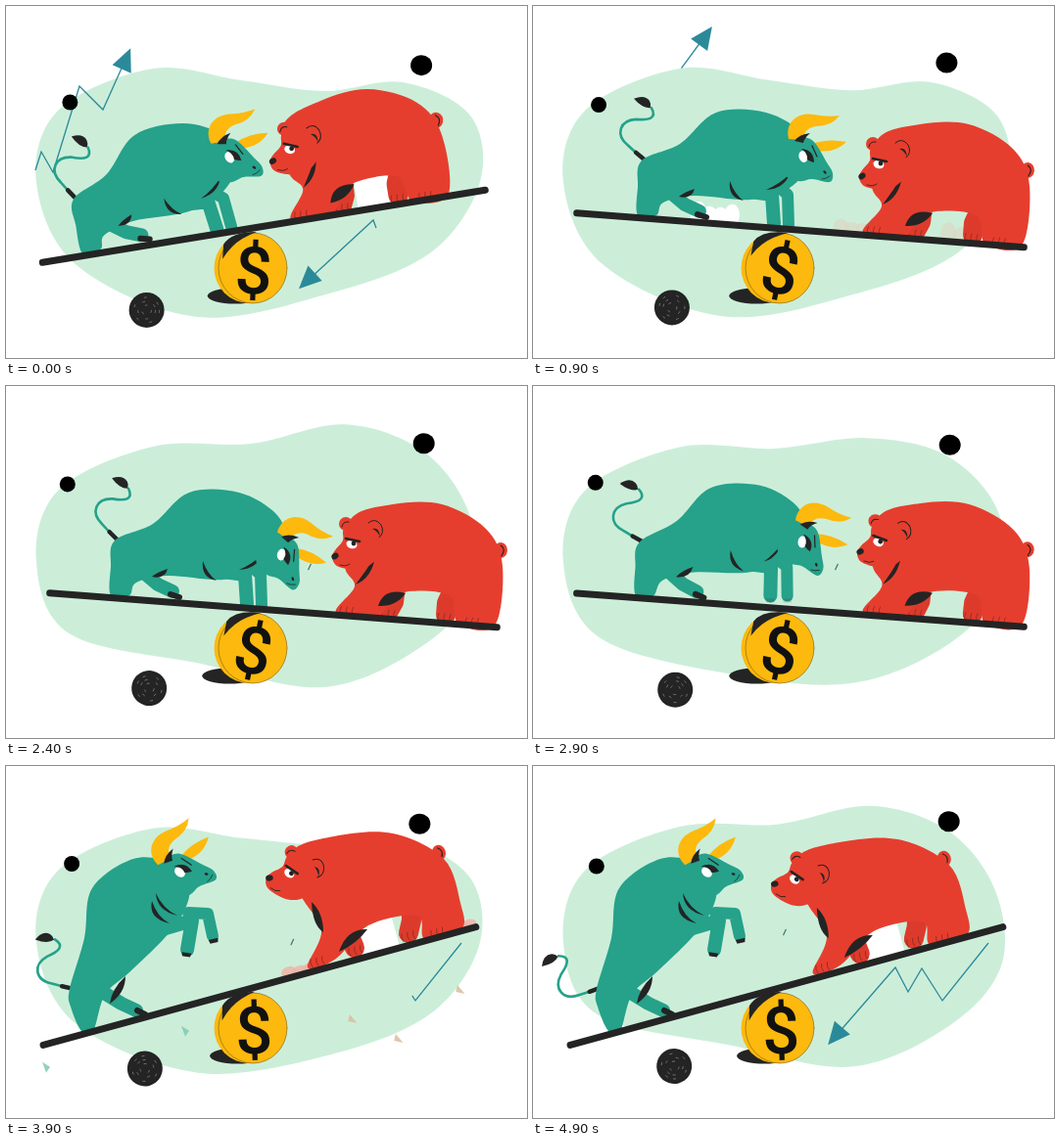
An HTML page with a canvas for the animation above (5000 ms loop, 532 by 360 pixels).

```html
<!DOCTYPE html>
<html lang="en">
<head>
<meta charset="utf-8">
<title>Bull and bear on a seesaw</title>
<style>
html, body { margin: 0; width: 100%; height: 100%; overflow: hidden; background: #fff; }
canvas { display: block; }
</style>
</head>
<body>
<canvas id="stage" width="532" height="360"></canvas>
<script>
const ctx = document.getElementById('stage').getContext('2d');
const LOOP = 5000, STEP = 100, RAD = Math.PI / 180;
const PIVOT = [250, 227.5], DOWN = 4.4, UP = -15.3;
const INK = '#242424', TEAL = '#26a18a', RED = '#e63e2e', DEEP_RED = '#dc3b2c';
const GOLD = '#fdb90d', MINT = '#cceed9', LINE = '#2b8a99';

// Timing: linear ramp, smooth ease, a soft on-off pulse, and a settling decay.
const ramp = (t, a, b) => Math.min(1, Math.max(0, (t - a) / (b - a)));
const ease = (t, a, b) => (1 - Math.cos(Math.PI * ramp(t, a, b))) / 2;
const pulse = (t, a, b) => Math.min(1, 2 * Math.sin(Math.PI * ramp(t, a, b)));
const bell = (t, mid, width) => Math.exp(-(((t - mid) / width) ** 2));
const settle = t => (1 - ramp(t, 0, 800)) ** 2;
const lerp = (a, b, f) => a + (b - a) * f;
const mix = (a, b, f) => a.map((v, i) => lerp(v, b[i], f));

// Stage coordinates to plank coordinates for a plank at the given tilt.
function onPlank(deg, pts) {
  const c = Math.cos(deg * RAD), s = Math.sin(deg * RAD), out = [];
  for (let i = 0; i < pts.length; i += 2) {
    const x = pts[i] - PIVOT[0], y = pts[i + 1] - PIVOT[1];
    out.push(x * c + y * s, y * c - x * s);
  }
  return out;
}

// A part as seen with the plank down and with the plank up.
function part(low, high) {
  const a = onPlank(DOWN, low), b = onPlank(UP, high);
  return f => mix(a, b, f);
}

const BLOB_A = [31,180, 54,106, 150,64, 240,76, 325,87, 405,78, 474,112, 484,180, 434,252, 330,294, 195,318, 72,265];
const BLOB_B = [31,180, 54,106, 150,62, 250,59, 345,39, 425,66, 472,128, 478,205, 425,266, 325,308, 200,284, 66,254];

const bull = {
  body: part(
    [111,158, 150,141, 187,109, 238,109, 276,131, 284,158, 262,186, 222,198, 165,194, 133,201, 126,214, 107,214, 107,185],
    [65,228, 80,176, 88,125, 130,95, 168,100, 187,126, 179,154, 160,178, 126,211, 101,234, 89,271, 77,271, 66,246]),
  near: part([215,189, 244,193, 246,223], [163,166, 190,158, 185,188]),
  far: part([250,184, 260,193, 261,224], [186,150, 206,151, 211,174]),
  hind: part([142,192, 155,203, 170,210], [100,232, 118,243, 133,250]),
  hoof: part([168,213, 177,216], [134,250, 142,254]),
  thigh: part([165,187, 162,198, 149,195, 155,190], [122,215, 122,232, 106,243, 108,228]),
  shoulder: part([201,179, 199,196, 215,199, 206,193], [149,138, 145,156, 167,161, 154,154]),
  neck: part([262,172, 256,187, 238,188, 252,182], [153,130, 154,148, 175,153, 160,146]),
  tail: part([113,156], [67,227]),
  eye: part([279,154], [180,107]),
  lowered: onPlank(DOWN, [284,174])
};

const bear = {
  body: part(
    [352,136, 395,121, 445,121, 490,146, 507,184, 499,245, 462,243, 452,214, 402,212, 378,237, 337,232, 356,205, 346,184],
    [292,88, 335,72, 395,69, 447,95, 464,140, 465,167, 428,177, 420,153, 370,163, 337,197, 308,206, 322,168, 300,130]),
  front: part([398,205, 396,221, 391,230], [343,160, 352,176, 356,186]),
  back: part([458,205, 450,222, 449,234], [414,142, 414,158, 411,171]),
  chest: part([377,174, 374,196, 357,203, 367,190], [312,139, 313,163, 324,170, 324,150]),
  pit: part([380,225, 386,206, 408,212, 398,226], [340,190, 348,166, 369,167, 358,182]),
  gap: part([406,240], [358,198]),
  tail: part([504,168], [441,89]),
  eye: part([353,160], [290,108])
};

function smooth(p) {
  const n = p.length / 2, at = i => [p[(i + n) % n * 2], p[(i + n) % n * 2 + 1]];
  ctx.beginPath();
  ctx.moveTo(p[0], p[1]);
  for (let i = 0; i < n; i++) {
    const [a, b, c, d] = [at(i - 1), at(i), at(i + 1), at(i + 2)];
    ctx.bezierCurveTo(b[0] + (c[0] - a[0]) / 6, b[1] + (c[1] - a[1]) / 6,
      c[0] - (d[0] - b[0]) / 6, c[1] - (d[1] - b[1]) / 6, c[0], c[1]);
  }
}

function fill(color) { ctx.fillStyle = color; ctx.fill(); }
function stroke(color, w) { ctx.strokeStyle = color; ctx.lineWidth = w; ctx.stroke(); }
function blobby(p, color) { smooth(p); fill(color); }
function path(d, color) { ctx.fillStyle = color; ctx.fill(new Path2D(d)); }
function curve(d, color, w) { ctx.strokeStyle = color; ctx.lineWidth = w; ctx.stroke(new Path2D(d)); }

function oval(x, y, rx, ry, color, turn = 0) {
  ctx.beginPath();
  ctx.ellipse(x, y, rx, ry, turn, 0, 7);
  fill(color);
}

function line(p, color, w) {
  ctx.beginPath();
  for (let i = 0; i < p.length; i += 2) ctx.lineTo(p[i], p[i + 1]);
  stroke(color, w);
}

// Ends at the first and third points, bulging towards the others.
function crescent(p) {
  ctx.beginPath();
  ctx.moveTo(p[0], p[1]);
  ctx.quadraticCurveTo(p[2], p[3], p[4], p[5]);
  ctx.quadraticCurveTo(p[6], p[7], p[0], p[1]);
  fill(INK);
}

function group(x, y, deg, draw) {
  ctx.save();
  ctx.translate(x, y);
  ctx.rotate(deg * RAD);
  draw();
  ctx.restore();
}

function faded(alpha, draw) {
  if (alpha <= 0) return;
  ctx.save();
  ctx.globalAlpha = alpha;
  draw();
  ctx.restore();
}

function arrow(p, from, to, size) {
  let len = 0;
  for (let i = 2; i < p.length; i += 2) len += Math.hypot(p[i] - p[i - 2], p[i + 1] - p[i - 1]);
  ctx.save();
  ctx.lineCap = 'butt';
  ctx.lineJoin = 'miter';
  ctx.setLineDash([Math.max(0, to - from) * len, len * 2]);
  ctx.lineDashOffset = -from * len;
  line(p, LINE, 1.3);
  ctx.restore();
  const [x0, y0, x, y] = p.slice(-4);
  group(x, y, Math.atan2(y - y0, x - x0) / RAD, () => {
    ctx.scale(size, size);
    path('M15 0L-8 -10L-8 11Z', LINE);
  });
}

function drawArrows(t) {
  const rise = ramp(t, 0, 900);
  if (t < 1300) {
    group(lerp(121, 174, rise), lerp(57, 33, rise), 12 * rise, () =>
      arrow([-91,111, -85,92, -73,113, -46,25, -22,49, 0,0],
        .83 * rise + .17 * ramp(t, 900, 1300), 1, 1 - ramp(t, 900, 1300)));
  }
  if (t < 400) arrow([378,227, 375,219, 310,279], t / 400, 1, 1 - t / 400);
  if (t > 3700) {
    const end = ramp(t, 3650, 4450);
    arrow([465,181, 418,240, 397,207, 383,231, 370,206, 311,274], 0, end, end < 1 ? 0 : 1);
  }
}

function drawBalls(t) {
  const a = (100 + t / 3300 * 360) * RAD, dx = 2.2 * Math.cos(a), dy = 2 * Math.sin(a);
  oval(424.5 + dx, 58.7 + dy, 11, 10.5, '#000');
  oval(65 - dx, 100.5 - dy, 8, 8, '#000');
  group(144 + dx, 309 + dy, Math.floor(t / 300) * 75, () => {
    oval(0, 0, 18, 18, INK);
    ctx.lineCap = 'butt';
    for (let r = 5; r < 17; r += 4) {
      ctx.setLineDash([3, 5 + r / 2]);
      ctx.beginPath();
      ctx.arc(0, 0, r, 0, 6.28);
      stroke('#8a8a8a', .7);
    }
  });
}

function drawCoin(tilt) {
  oval(230 - tilt * .4, 296.5, 28, 8, INK);
  oval(248.5, 268, 36, 36, GOLD);
  oval(252, 268, 35, 36, GOLD);
  stroke('#8f6b17', .7);
  group(250, 268, tilt * .5 + 5, () => path('M-28 -24Q-20 -37 6 -37Q-10 -31 -19 -22Q-25 -16 -29 -9Z', INK));
  group(253, 268, 9 + tilt * .7, () => {
    ctx.font = '500 67px Roboto, sans-serif';
    ctx.textAlign = 'center';
    ctx.fillStyle = '#111';
    ctx.fillText('$', 0, 26);
  });
}

function cloud(x0, x1, h, color, alpha) {
  const n = Math.round((x1 - x0) / 11);
  faded(alpha, () => {
    for (let i = 0; i <= n; i++) {
      const r = h * (.6 + .4 * Math.abs(Math.cos(i * 2.1)));
      oval(lerp(x0, x1, i / n), -r * .6 - 2, 8, r, color);
    }
  });
}

function drawDust(t) {
  const kick = pulse(t, 1200, 2100), brake = pulse(t, 600, 1200), stamp = pulse(t, 3500, 4300) * .8;
  cloud(-196, -124, 9, '#eeb6ae', kick);
  cloud(-78, -14, 13, '#eeb6ae', kick);
  cloud(-82, -48, 12, '#fff', brake);
  cloud(64, 98, 8, '#dcd5c2', brake * .6);
  cloud(174, 200, 11, '#dcd5c2', brake * .6);
  cloud(42, 64, 6, '#edb3a6', stamp);
  cloud(215, 232, 6, '#edb3a6', stamp);
}

function bullHead() {
  path('M6 -13Q22 -19 41 -15Q29 -3 11 -6Z', GOLD);
  blobby([-27,-16, -8,-19, 7,-16, 21,6, 27,17, 24,26, 6,23, -8,25, -24,16], TEAL);
  path('M-18 -18C-22 -36 -8 -46 8 -43Q22 -40 34 -42Q26 -31 10 -31Q-3 -29 -3 -17Z', GOLD);
  path('M-12 -16Q-7 -23 4 -24Q-2 -19 -3 -14Z', INK);
  oval(-3, 0, 4.5, 6, '#fff', -.3);
  path('M-5 -8Q8 -7 8 6Q4 5 1 3Q2 -3 -5 -8Z', INK);
  curve('M6 -11L11 0', INK, 1.2);
  oval(19, 16, 2, 1.2, INK, .8);
  curve('M16 23Q20 23 24 20', INK, .7);
}

function bullTail() {
  curve('M3 2Q-8 -5 -16 -13C-30 -24 -25 -39 -8 -40C6 -39 13 -42 7 -52', TEAL, 2.6);
  curve('M3 3L-8 -6', INK, 4.5);
  path('M6 -52Q-2 -51 -11 -61Q0 -66 5 -59Q7 -56 6 -52Z', INK);
}

function drawBull(t, tilt) {
  const rear = ease(t, 2650, 3600), charge = ease(t, 1100, 1500);
  const p = name => bull[name](rear);

  group(-30 * settle(t) + 7 * Math.sin(Math.PI * ramp(t, 2700, 3900)), 0, 0, () => {
    const [tx, ty] = p('tail');
    const swing = 7 * settle(t) + 24 * bell(t, 1800, 500) - 26 * ease(t, 2500, 3400) - 33 * ease(t, 3800, 4900);
    group(tx, ty, swing - tilt, bullTail);
    line(p('hind'), TEAL, 14);
    line(p('hoof'), INK, 6);
    line(p('far'), TEAL, 12);

    // The hind foot scrapes back before the charge.
    const body = p('body'), scrape = 16 * pulse(t, 1200, 2100);
    body[20] -= scrape;
    body[22] -= scrape;
    blobby(body, TEAL);
    line(p('near'), TEAL, 14);
    crescent(p('thigh'));

    for (const name of ['near', 'far']) {
      const [, , x0, y0, x, y] = p(name);
      group(x, y, Math.atan2(y - y0, x - x0) / RAD, () => faded(rear, () => path('M3 -5L7 -4L7 4L3 5Z', INK)));
    }
    crescent(p('shoulder'));
    crescent(p('neck'));
    const [ex, ey] = mix(mix(bull.eye(0), bull.lowered, charge), bull.eye(1), rear);
    group(ex, ey, lerp(29 * charge - DOWN, -16.7, rear), bullHead);
  });
}

function bearHead() {
  oval(-6, -19, 7, 7, RED);
  curve('M-10 -16Q-9 -22 -3 -21', INK, 1);
  blobby([-20,16, -17,8, -9,-2, -8,-14, 6,-24, 24,-22, 32,-4, 26,16, 10,27, -13,25], RED);
  oval(24, -15, 9, 9, RED);
  curve('M17 -20Q24 -26 30 -18Q34 -10 28 -5', INK, 1);
  path('M21 -14Q28 -16 29 -6Q26 -12 21 -14Z', INK);
  oval(0, 2, 5.5, 4.2, '#fff', .3);
  oval(2, 1, 2.4, 2.4, INK);
  curve('M-6 -4L8 -1', INK, 2.6);
  oval(-17, 14, 3.8, 3, INK, -.6);
  curve('M-12 23Q-6 25 -2 22', INK, .8);
}

function claws(x, y) {
  for (let i = 0; i < 3; i++) curve(`M${x + i * 6} ${y}q-2 -4 0 -8`, '#8e2a22', .8);
}

function drawBear(t) {
  const up = ease(t, 2700, 3900);
  const p = name => bear[name](up);
  const slide = -45 * settle(t) + 8 * Math.sin(Math.PI * up) - 23 * ramp(t, 3900, 4900);

  group(slide, 0, 0, () => {
    const front = p('front'), back = p('back'), body = p('body');
    const [gx] = p('gap'), [tx, ty] = p('tail');
    faded(1 - ramp(t, 0, 300) + ramp(t, 3500, 3800), () => {
      ctx.fillStyle = '#fff';
      ctx.fillRect(gx, -32, 46, 30);
    });
    line(front, DEEP_RED, 20);
    line(back, DEEP_RED, 20);
    claws(front[4] - 6, front[5] + 7);
    claws(back[4] - 7, back[5] + 7);
    oval(tx + 1, ty, 7, 8, RED);
    curve(`M${tx + 1} ${ty - 5}q6 4 1 11`, INK, 1.2);
    blobby(body, RED);
    crescent(p('pit'));
    claws(body[20] + 5, body[21] + 1);
    claws(body[12] + 8, body[13] + 1);
    crescent(p('chest'));
    group(...p('eye'), lerp(10 * settle(t) - DOWN * (1 - settle(t)), 37.5, ease(t, 2700, 3400)), bearHead);
  });
}

function shards(list, x, y, turn, color) {
  for (let i = 0; i < list.length; i += 2) {
    group(list[i] + x, list[i + 1] + y, turn, () => path('M-4 -5L4 0L0 6Z', color));
  }
}

function drawShards(t) {
  const warm = [470,270, 360,300, 407,320];
  const d = (t - 1600) * .026, e = (t - 3400) * .026;
  faded(pulse(t, 1300, 2100), () => {
    shards([20,234, 124,283, 164,260], d, -d / 4, 0, '#3fae98');
    shards(warm, -d, -d / 4, 160, '#cf7258');
  });
  faded(pulse(t, 3000, 4050), () => {
    shards([28,311, 170,274], e, -e / 4, 0, '#85c9b6');
    shards(warm, 6 - e, -37 - e / 4, 160, '#d8bd9f');
  });
}

function draw(t) {
  const tilt = lerp(DOWN, -9.3, settle(t)) + (UP - DOWN) * ease(t, 2850, 3900);
  const morph = bell(t, 2450, 760) + bell(t, 5050, 760);

  ctx.fillStyle = '#fff';
  ctx.fillRect(0, 0, 532, 360);
  ctx.lineCap = ctx.lineJoin = 'round';
  blobby(mix(BLOB_A, BLOB_B, morph), MINT);
  drawArrows(t);
  drawBalls(t);
  drawShards(t);
  drawCoin(tilt);

  group(...PIVOT, tilt, () => {
    drawDust(t);
    drawBear(t);
    drawBull(t, tilt);
    const left = 209 - .7 * tilt;
    line([-left, 0, 458 - left, 0], INK, 7);
  });

  if (t >= 1500) {
    const drift = ramp(t, 3400, 4900);
    group(310 - 53 * drift, 185 - 15 * drift, 25, () => curve('M0 -3L0 3', '#3c7468', 1.2));
  }
}

function tick() {
  draw(Math.floor(performance.now() % LOOP / STEP) * STEP);
  requestAnimationFrame(tick);
}
tick();
</script>
</body>
</html>
```
